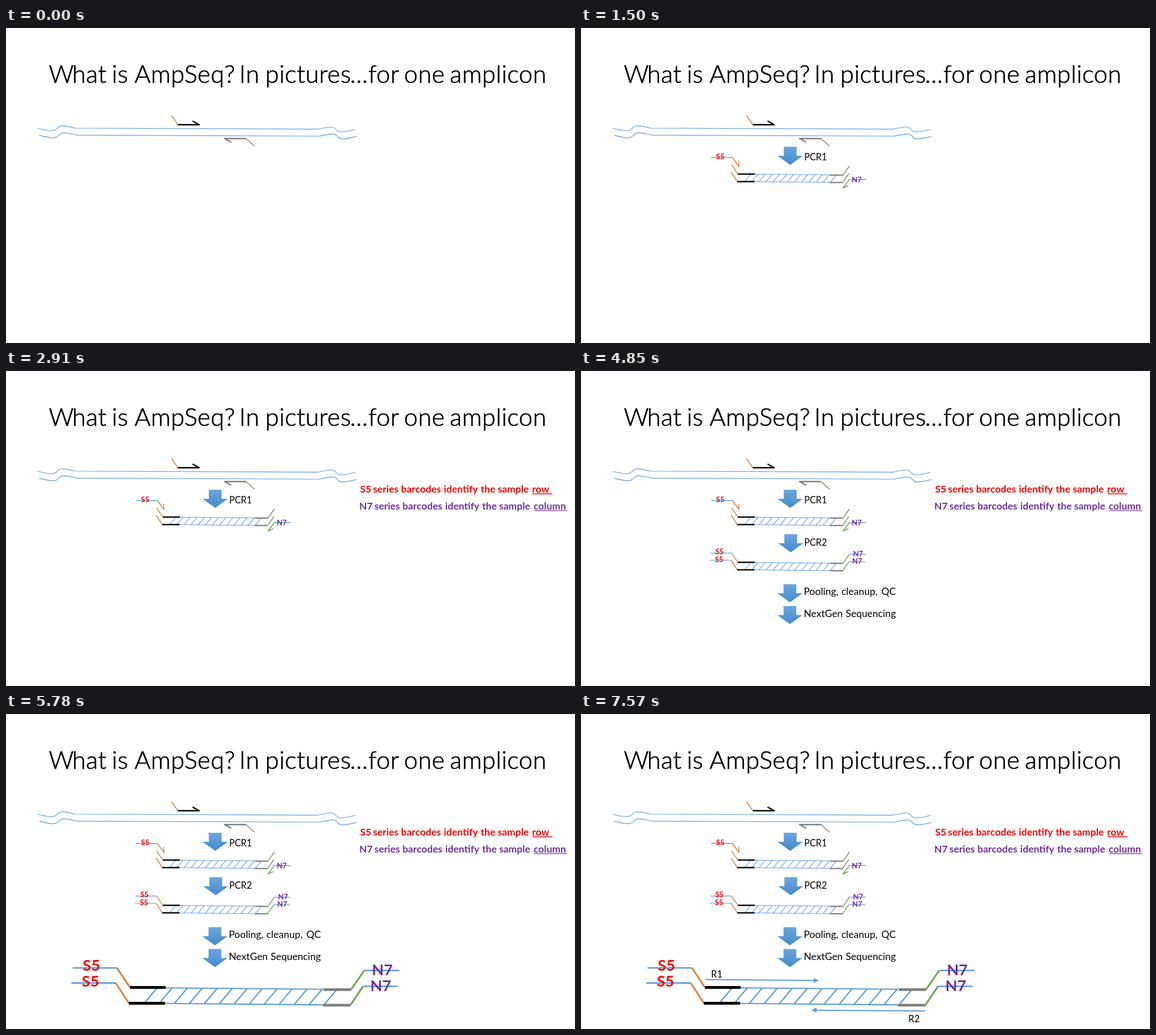
Recreate the animation shown at these times as an HTML page with a canvas. Size 1005x557 px, loop 8 s.

```html
<!DOCTYPE html>
<html lang="en">
<head>
<meta charset="utf-8">
<title>What is AmpSeq?</title>
<style>
html, body { margin: 0; width: 100%; height: 100%; overflow: hidden; background: #fff; }
canvas { display: block; width: 1005px; height: 557px; }
</style>
</head>
<body>
<canvas id="stage"></canvas>
<script>
const W = 1005, H = 557, LOOP = 8000;
const BLUE = '#5b9bd5', ORANGE = '#e08344', TAN = '#c6873f', GREEN = '#6fa84f',
      OLIVE = '#8b8560', GRAY = '#7f7f7f', BLACK = '#000', RED = '#f00', PURPLE = '#7030a0';

const canvas = document.getElementById('stage');
const ctx = canvas.getContext('2d');
const ratio = window.devicePixelRatio || 1;
canvas.width = W * ratio;
canvas.height = H * ratio;

function line(color, width, ...pts) {
  ctx.strokeStyle = color;
  ctx.lineWidth = width;
  ctx.beginPath();
  for (let i = 0; i < pts.length; i += 2) ctx.lineTo(pts[i], pts[i + 1]);
  ctx.stroke();
}

function fill(color, ...pts) {
  ctx.fillStyle = color;
  ctx.beginPath();
  for (let i = 0; i < pts.length; i += 2) ctx.lineTo(pts[i], pts[i + 1]);
  ctx.fill();
}

function text(str, x, y, size, color = BLACK, weight = 400) {
  ctx.font = `${weight} ${size}px Lato, Carlito, sans-serif`;
  ctx.fillStyle = color;
  ctx.fillText(str, x, y);
  // Light type gets a thin outline to reach the right stem weight
  if (weight === 300) {
    ctx.strokeStyle = color;
    ctx.lineWidth = 0.7;
    ctx.strokeText(str, x, y);
  }
}

// Draws each word of a phrase at its own x
function words(phrase, xs, y, size, color, weight) {
  phrase.split(' ').forEach((word, i) => text(word, xs[i], y, size, color, weight));
}

function blockArrow(x, y) {
  const shade = ctx.createLinearGradient(0, y, 0, y + 32);
  shade.addColorStop(0, '#6ca6dd');
  shade.addColorStop(1, '#458acb');
  fill(shade, x - 11.3, y, x + 11.3, y, x + 11.3, y + 16, x + 22.3, y + 16,
    x, y + 32, x - 22.3, y + 16, x - 11.3, y + 16);
}

function strand(dx, dy) {
  ctx.save();
  ctx.translate(dx, dy);
  ctx.strokeStyle = BLUE;
  ctx.lineWidth = 1.15;
  ctx.beginPath();
  ctx.moveTo(56, 177.5);
  ctx.bezierCurveTo(66, 179.5, 74, 182, 82, 181.5);
  ctx.bezierCurveTo(91, 181, 90, 174, 98, 173);
  ctx.bezierCurveTo(106, 172.3, 114, 175.5, 123, 177);
  ctx.lineTo(551, 178.8);
  ctx.bezierCurveTo(560, 177, 568, 174.7, 575, 175);
  ctx.bezierCurveTo(584, 175.5, 582, 183, 590, 183.7);
  ctx.bezierCurveTo(598, 184, 607, 181.5, 617, 179.3);
  ctx.stroke();
  ctx.restore();
}

function template() {
  ctx.letterSpacing = '0.4px';
  words('W hat is AmpSeq? In pictures … for one amplicon',
    [75.5, 117, 187, 227, 412, 458, 607.5, 640, 703, 784], 97, 43.5, BLACK, 300);
  ctx.letterSpacing = '0px';
  strand(0, 0);
  strand(2.6, 12.4);
  line(TAN, 1.6, 292.5, 155, 303.5, 171);
  line(BLACK, 2.5, 303.5, 171, 341.3, 171, 329.5, 164.5);
  line(OLIVE, 1.6, 424, 195.5, 439, 209);
  line(GRAY, 2.5, 424, 195.5, 386, 195.5, 397.8, 202);
}

// Ladder with primer ends; indexed ones also carry the barcode tails
function amplicon(x, y, scale, indexed) {
  const left = indexed ? ORANGE : TAN, right = indexed ? GREEN : OLIVE;
  ctx.save();
  ctx.translate(x, y);
  ctx.scale(scale, scale);
  for (let i = 0; i < 13; i++) {
    const hx = 12 + i * 12.6;
    line(BLUE, 1.05, hx, 13.3 + i * 0.11, hx + 11, 0.2 + i * 0.11);
  }
  line(BLUE, 1.05, 30, 0.3, 163, 1.5);
  line(BLUE, 1.05, 29, 13.4, 163, 14.7);
  line(left, 1.5, -11, -16.5, 0, 0);
  line(left, 1.5, -12, -3.8, -1, 13.2);
  line(right, 1.5, 186, 1.6, 197, -14.3);
  line(right, 1.5, 185.5, 14.6, 196, -1);
  line(BLACK, 2.4, 0, 0, 30, 0);
  line(BLACK, 2.4, -1, 13.3, 29.5, 13.3);
  line(GRAY, 2.2, 163, 1.8, 186, 1.8);
  line(GRAY, 2.2, 162.5, 14.9, 185.5, 14.9);
  if (indexed) {
    line(BLUE, 1.2, -48.3, -16.5, -11, -16.5);
    line(BLUE, 1.2, -49.3, -3.8, -12, -3.8);
    line(BLUE, 1.2, 197, -14.3, 226.5, -14.3);
    line(BLUE, 1.2, 196, -1, 225, -1);
    text('S5', -39.8, -13.9, 13, RED, 700);
    text('S5', -40.6, -0.8, 13, RED, 700);
    text('N7', 203.4, -10.2, 13, PURPLE, 700);
    text('N7', 202.1, 3.1, 13, PURPLE, 700);
  }
  ctx.restore();
}

function firstPcr() {
  blockArrow(369.5, 210);
  text('PCR1', 394.2, 234, 16.3);
  amplicon(277, 258.3, 1, false);
}

function indexPrimers() {
  line(BLUE, 1.5, 230, 228.7, 267.5, 229);
  line(ORANGE, 1.6, 267.5, 229, 279, 245, 278.3, 235);
  text('S5', 238.6, 231.5, 13, RED, 700);
  line(BLUE, 1.5, 474, 268, 503, 268);
  line(GREEN, 1.6, 474, 268, 462.7, 283, 472.3, 278.7);
  text('N7', 478.3, 272.5, 13, PURPLE, 700);
}

function legend() {
  words('S5 series barcodes identify the sample row',
    [625.5, 648.2, 697.8, 773.3, 838.5, 868.5, 929.2], 215, 17.5, RED, 700);
  line(RED, 1.4, 930, 217.3, 965, 217.3);
  words('N7 series barcodes identify the sample column',
    [624, 650.7, 700.3, 775.8, 841, 871, 932], 244.5, 17.5, PURPLE, 700);
  line(PURPLE, 1.4, 933, 246.9, 991, 246.9);
}

function secondPcr() {
  blockArrow(370.5, 288.5);
  text('PCR2', 394.2, 309, 16.3);
  amplicon(277, 338.3, 1, true);
}

function sequencing() {
  blockArrow(369, 377);
  words('Pooling, cleanup, QC', [393.5, 460, 530.5], 396, 17.5);
  blockArrow(369, 415.5);
  words('NextGen Sequencing', [393.5, 467.5], 434.5, 17.5);
}

function enlarged() {
  amplicon(219, 483.6, 2.1, true);
}

function readOne() {
  text('R1', 229.8, 465.5, 16.5);
  line(BLUE, 2, 219.5, 469.5, 412, 471.2);
  fill(BLUE, 420, 471.3, 411, 467, 411, 475.5);
}

function readTwo() {
  line(BLUE, 2, 608, 525.3, 415, 523.7);
  fill(BLUE, 407, 523.6, 416, 519.4, 416, 527.9);
  text('R2', 578.3, 544.7, 16.5);
}

const steps = [
  [0, template], [740, firstPcr], [1500, indexPrimers], [2910, legend], [3920, secondPcr],
  [4850, sequencing], [5780, enlarged], [6560, readOne], [7570, readTwo]
];

const start = performance.now();

function render() {
  const t = Math.max(0, performance.now() - start) % LOOP;
  ctx.setTransform(ratio, 0, 0, ratio, 0, 0);
  ctx.lineJoin = 'round';
  ctx.fillStyle = '#fff';
  ctx.fillRect(0, 0, W, H);
  for (const [at, draw] of steps) if (t >= at) draw();
  requestAnimationFrame(render);
}
render();
</script>
</body>
</html>
```
